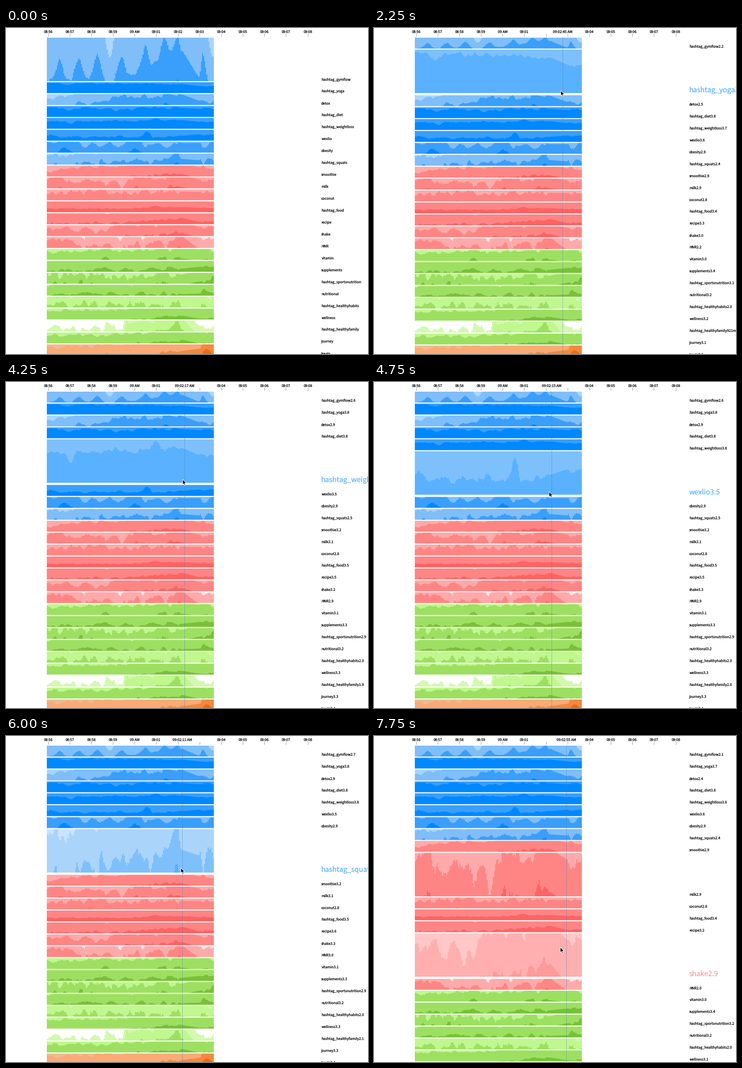
Animation, 789 px wide and 710 px high, one loop 8 s. Source, as a matplotlib script:

```python
import numpy as np
import matplotlib.pyplot as plt
from matplotlib.animation import FuncAnimation
from matplotlib.colors import to_rgb
from matplotlib.patches import Polygon, Rectangle

W, H, DPI = 789, 710, 100
FRAMES, INTERVAL = 32, 250
LEFT, RIGHT, TOP, STEP = 89, 453, 21, 2.36
PITCH, BIG_PITCH, HOVER_EXTRA = 25.95, 97, 2.5
GAP = 2.2
TICK0, MINUTE = 92, 47.17
LABEL_X, FONT_PX = 687, 7.7
SS = 4  # vertical oversampling of the charts

plt.rcParams["font.family"] = ["Noto Sans CJK JP", "DejaVu Sans"]
plt.rcParams["text.hinting"] = "no_hinting"


def palette(*tones):
    return np.array([to_rgb(c) for c in ("#ffffff",) + tones])


BLUE = palette("#abd6ff", "#7fbef8", "#3a9ffb", "#0088ff")
RED = palette("#ffe4e4", "#ffaaaa", "#ff8585", "#ff6464")
GREEN = palette("#d3f9ae", "#c0f78f", "#9de062", "#78c139")
ORANGE = palette("#efbb93", "#f9aa76", "#f28a3e", "#f06a10")

pixels = np.arange(LEFT, RIGHT)
column = ((pixels - LEFT) / STEP).astype(int)
xs = LEFT + (np.arange(column[-1] + 1) + .5) * STEP
# Jitter fades out where the ruler travels
calm = np.clip(np.maximum(381 - xs, xs - 421) / 6, 0, 1)
kernel = np.exp(-np.linspace(-2, 2, 9) ** 2)
kernel /= np.sqrt((kernel ** 2).sum())
rng = np.random.default_rng(7)
rows = []


def row(name, pal, levels, rough, size=0.0, up=(), down=(), ramp=170):
    """Series in band units 0..4: trend through four levels, bumps, jitter."""
    trend = np.interp(xs, [262 - ramp, 262, 384, 419], levels)
    jitter = np.convolve(rng.normal(size=len(xs) + 8), kernel, "valid")
    jitter += rng.normal(0, .25, len(xs))
    wave = rough * jitter
    for sign, places in ((size, up), (-size, down)):
        for x in places:
            wave += sign * np.exp(-((xs - x) / 7) ** 2 / 2)
    rows.append((name, pal, np.clip(trend + wave * calm, .03, 3.97)))


row("hashtag_gymflow", BLUE, (2.05, 2.1, 2.7, 2.1), .05, .5,
    up=(118, 157, 199, 250, 304, 345, 374, 427), down=(225, 451))
row("hashtag_yoga", BLUE, (3.92, 3.88, 3.82, 3.66), .03, .2, down=(135,))
row("detox", BLUE, (1.6, 2.75, 2.96, 2.4), .11)
row("hashtag_diet", BLUE, (3.8, 3.88, 3.84, 3.75), .05, .22,
    down=(135, 209, 240, 275))
row("hashtag_weightloss", BLUE, (3.66, 3.74, 3.8, 3.64), .03, .2,
    up=(325,), down=(139,))
row("wexlio", BLUE, (3.42, 3.35, 3.46, 3.58), .06, .4, up=(306,))
row("obesity", BLUE, (2.95, 2.95, 2.88, 2.9), .09, .4,
    up=(127, 281), down=(172, 206, 240, 304, 352, 434))
row("hashtag_squats", BLUE, (1.8, 2.35, 2.52, 2.4), .13, .6, up=(370,))
row("smoothie", RED, (2.65, 3, 3.22, 2.85), .07, .25, down=(101,))
row("milk", RED, (2.9, 2.8, 3.1, 2.85), .15, .6, down=(155, 216, 253))
row("coconut", RED, (2.6, 2.75, 2.8, 2.78), .13)
row("hashtag_food", RED, (3.35, 3.35, 3.48, 3.4), .03, .2, up=(325,))
row("recipe", RED, (3.05, 3.12, 3.58, 3.22), .07)
row("shake", RED, (2.6, 2.95, 3.3, 2.85), .1, .35,
    up=(376,), down=(153, 193, 215))
row("HNR", RED, (2.7, 2.25, 3.05, 1.95), .15, .6, down=(173, 250, 300, 345))
row("vitamin", GREEN, (2.7, 2.85, 3.12, 2.95), .1, .35, up=(214,))
row("supplements", GREEN, (3.1, 3.2, 3.3, 3.45), .08, .25, up=(214,))
row("hashtag_sportsnutrition", GREEN, (2.9, 2.8, 2.85, 3.2), .22)
row("nutritional", GREEN, (3.1, 3.12, 3.15, 3.2), .08, .25, up=(430,))
row("hashtag_healthyhabits", GREEN, (2.1, 2.3, 2.04, 1.96), .22, .8,
    up=(374,))
row("wellness", GREEN, (2.8, 2.95, 3.33, 3.1), .06)
row("hashtag_healthyfamily", GREEN, (.3, 2, 2.2, .55), .2, .8, up=(374,),
    ramp=8)
row("journey", GREEN, (2.7, 2.85, 3.32, 3), .08)
row("treats", ORANGE, (1.7, 2.05, 2.4, 2.6), .1, .6, up=(434, 446))

# Pointer keys: frame, x, y
TRACK = np.array([
    (4, 407, 60), (9, 407, 136), (11, 391, 160), (12, 391, 160),
    (13, 388, 190), (17, 385, 212), (20, 380, 252), (21, 380, 256),
    (26, 382, 308), (27, 411, 317), (28, 415, 345), (29, 424, 445),
    (31, 406, 460)])
ENTER = TRACK[0, 0]
ARROW = np.array([(0, 0), (0, 11.5), (2.6, 9.2), (4.4, 13.4), (6.3, 12.6),
                  (4.5, 8.5), (8, 8.3)])


def pointer(i):
    return [np.interp(i, TRACK[:, 0], TRACK[:, c]) for c in (1, 2)]


def layout(hov, p, big):
    """Tops of all rows, plus the bottom of the last."""
    steps = [(BIG_PITCH if k in big else PITCH) + HOVER_EXTRA * p * (k == hov)
             for k in range(len(rows))]
    return TOP + np.concatenate([[0], np.cumsum(steps)])


def hover_states():
    """Per frame: hovered row, its progress and the enlarged rows.

    A row left in a jump of several rows stays enlarged."""
    hov, p, stuck, out = None, 0, set(), []
    for i in range(FRAMES):
        if i < ENTER:
            out.append((None, 0, {0}))
            continue
        tops = layout(hov, p, stuck | {hov if hov is not None else 0})
        k = int(np.searchsorted(tops, pointer(i)[1], "right")) - 1
        if k == hov:
            p = 1
        else:
            if hov is not None and abs(k - hov) > 1:
                stuck = stuck | {hov}
            hov, p = k, .77
        out.append((hov, p, stuck | {hov}))
    return out


STATES = hover_states()

fig = plt.figure(figsize=(W / 100, H / 100), dpi=DPI, facecolor="white")
ax = fig.add_axes([0, 0, 1, 1])
ax.axis("off")
picture = ax.imshow(np.ones((H, W, 3)), extent=(0, W, H, 0), aspect="auto",
                    interpolation="nearest", vmin=0, vmax=1)
ax.set_xlim(0, W)
ax.set_ylim(H, 0)


def points(px):
    return px * 72 / DPI


def label(x, y, s="", **kw):
    return ax.text(x, y, s, fontsize=points(FONT_PX), color="black",
                   va="baseline", **kw)


axis_box = Rectangle((LEFT, 0), W - LEFT, 20, transform=ax.transData)
ticks = []
for k in range(13):
    x = TICK0 + MINUTE * k
    s = "09 AM" if k == 4 else f"{8 + (56 + k) // 60:02d}:{(56 + k) % 60:02d}"
    t = label(x, 10.6, s, ha="center")
    t.set_clip_path(axis_box)
    ticks.append((x, t))
    ax.plot([int(x) + .5] * 2, [13, 18], color="#999999", lw=points(1))
clock = label(0, 10.6, ha="center")
names = [label(LABEL_X, 0) for _ in rows]
arrow = Polygon(ARROW, closed=True, fc="black", ec="white", lw=points(1),
                joinstyle="miter", zorder=5)
ax.add_patch(arrow)
RULE = np.array(to_rgb("steelblue"))


def short(v):
    return f"{v * 1000:.0f}m" if v < .95 else f"{v:.1f}"


def paint(img, top, h, pal, v, alpha):
    y0, y1 = round(top * SS), round((top + h) * SS)
    level = (np.arange(y1 - y0)[::-1, None] + .5) / (y1 - y0)
    band = np.clip(np.ceil(v - level), 0, 4).astype(int)
    part = img[y0:y1]
    part[:] = (1 - alpha * (1 - pal[band]))[:len(part), column]


def update(i):
    hov, p, big = STATES[i]
    active = hov is not None
    tops = layout(hov, p, big)
    # The ruler trails the pointer by one step
    rule = int(pointer(max(i - 1, ENTER))[0]) + 4
    here = column[rule - LEFT]

    chart = np.ones((H * SS, RIGHT - LEFT, 3))
    for k, ((name, pal, v), t) in enumerate(zip(rows, names)):
        q = p if k == hov else 0
        h = (BIG_PITCH if k in big else PITCH) - GAP
        fade = 1 - .35 * q
        paint(chart, tops[k], h, pal, v, fade)
        t.set_text(name + (short(v[here]) if active else ""))
        t.set_y(tops[k] + h - 1.2)
        t.set_fontsize(points(FONT_PX * (1 + q)))
        t.set_color(tuple(pal[4] * q))
        t.set_alpha(fade)
        t.set_visible(tops[k] < H)

    img = np.ones((H, W, 3))
    img[:, LEFT:RIGHT] = chart.reshape(H, SS, -1, 3).mean(axis=1)
    if active:
        img[TOP:, rule] = .5 * img[TOP:, rule] + .5 * RULE
        sec = int((rule - 375) * 60 / MINUTE)
        clock.set_text(f"09:{2 + sec // 60:02d}:{sec % 60:02d} AM")
        clock.set_x(rule)
        arrow.set_xy(ARROW + pointer(i))
    clock.set_visible(active)
    arrow.set_visible(active)
    for x, t in ticks:
        t.set_visible(not active or abs(x - rule) >= 48)
    picture.set_data(img)
    return [picture, arrow, clock, *names]


anim = FuncAnimation(fig, update, frames=FRAMES, interval=INTERVAL,
                     repeat=True, repeat_delay=0, blit=False)
plt.show()
```
